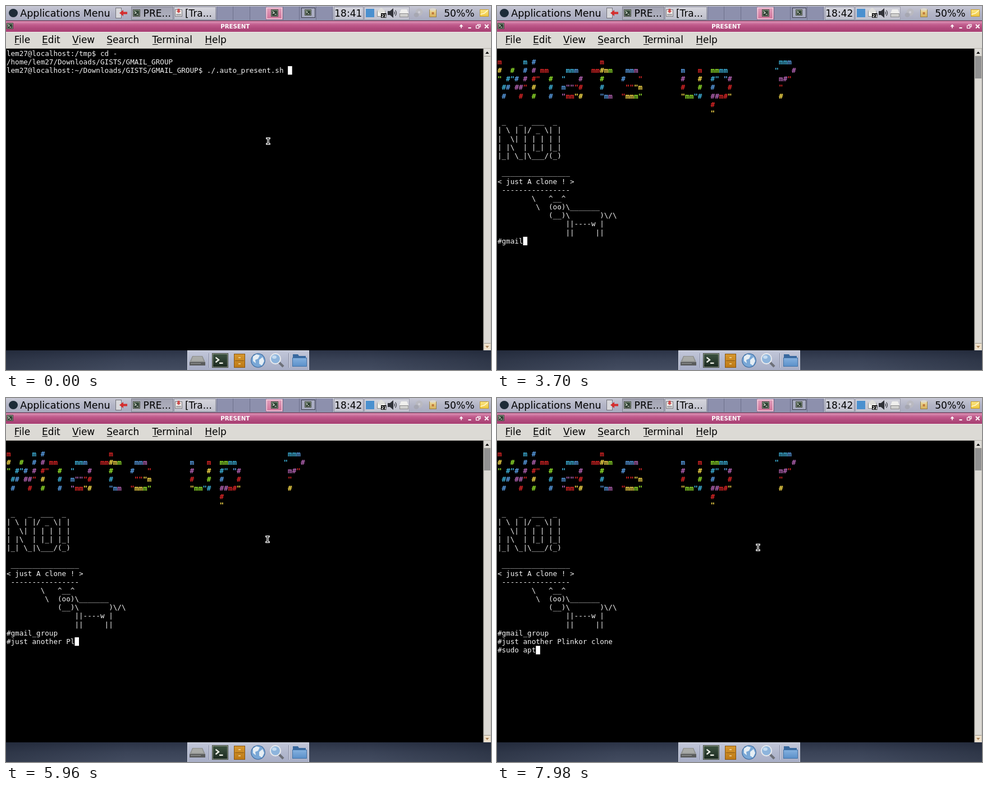
These frames come from a looping animation (864 by 648 pixels, 8 s). An HTML page with a canvas:

```html
<!DOCTYPE html>
<html lang="en">
<head>
<meta charset="utf-8">
<title>Terminal session</title>
<style>
html, body { margin: 0; width: 100%; height: 100%; overflow: hidden; background: #000; }
canvas { display: block; }
</style>
</head>
<body>
<canvas id="stage" width="864" height="648"></canvas>
<script>
const ctx = document.getElementById('stage').getContext('2d');
const SANS = '"DejaVu Sans", sans-serif';
const MONO = '"DejaVu Sans Mono", monospace';
const LOOP = 8000;
const CELL = { w: 7.594, h: 15.1875, x: 0.9, y: 76.7, base: 12 };
const RAINBOW = ['#b565b5', '#dc2626', '#fbdc4a', '#93e42c', '#3fb4dc', '#5a9fe6'];

// ---- terminal content ----
const PROMPT = [
  'lem27@localhost:/tmp$ cd -',
  '/home/lem27/Downloads/GISTS/GMAIL_GROUP',
  'lem27@localhost:~/Downloads/GISTS/GMAIL_GROUP$ ./.auto_present.sh '
];

const BANNER = [
  'm     m #               m                                         mmm',
  '#  #  # # mm    mmm   mm#mm   mmm          m   m  mmmm           "   #',
  '" #"# # #"  #  "   #    #    #   "         #   #  #" "#           m#"',
  ' ## ##" #   #  m"""#    #     """m         #   #  #   #           "',
  ' #   #  #   #  "mm"#    "mm  "mmm"         "mm"#  ##m#"           #',
  ' '.repeat(50) + '#',
  ' '.repeat(50) + '"'
];

const NO = [
  ' _   _  ___  _',
  '| \\ | |/ _ \\| |',
  '|  \\| | | | | |',
  '| |\\  | |_| |_|',
  '|_| \\_|\\___/(_)'
];

const COW = [
  ' ' + '_'.repeat(16),
  '< just A clone ! >',
  ' ' + '-'.repeat(16),
  '        \\   ^__^',
  '         \\  (oo)\\_______',
  '            (__)\\       )\\/\\',
  '                ||----w |',
  '                ||     ||'
];

// ---- timing ----
const keys = [];
const key = (t, s) => keys.push([t, s]);
const type = (t, s) => [...s].forEach((c, i) => key(t + i * 90, c));

key(3170, '#');
type(3340, 'gmail_gr');
key(4040, 'o');
key(4220, 'u');
key(4300, 'p');
key(4380, '\n');
key(4470, '#');
type(4560, 'just');
key(4910, ' ');
key(5080, 'a');
['no', 'th', 'er', ' P'].forEach((s, i) => key(5550 + i * 80, s));
type(5960, 'linkor cl');
key(6790, 'o');
key(6910, 'n');
key(7000, 'e');
key(7090, '\n');
type(7180, '#sudo');
key(7720, ' ');
key(7810, 'a');
key(7890, 'p');
key(7980, 't');

// pointer: time, x, y; null x hides it
const POINTER = [
  [0, 467, 240.5], [40, null], [3920, 467, 242.5], [4040, 466.5, 247.5],
  [4510, 466, 251.5], [6560, 466, 255], [6640, 465.5, 259],
  [6740, 465, 263.5], [6830, 465, 266]
];

// ---- drawing helpers ----
function rect(x, y, w, h, fill) {
  ctx.fillStyle = fill;
  ctx.fillRect(x, y, w, h);
}
function grad(x, y, w, h, ...stops) {
  const g = ctx.createLinearGradient(0, y, 0, y + h);
  stops.forEach((c, i) => g.addColorStop(i / (stops.length - 1), c));
  rect(x, y, w, h, g);
}
function frame(x, y, w, h, color, line = 1) {
  ctx.strokeStyle = color;
  ctx.lineWidth = line;
  ctx.strokeRect(x + 0.5, y + 0.5, w - 1, h - 1);
}
function poly(fill, ...p) {
  ctx.fillStyle = fill;
  ctx.beginPath();
  for (let i = 0; i < p.length; i += 2) ctx.lineTo(p[i], p[i + 1]);
  ctx.closePath();
  ctx.fill();
}
function path(color, line, ...p) {
  ctx.strokeStyle = color;
  ctx.lineWidth = line;
  ctx.beginPath();
  for (let i = 0; i < p.length; i += 2) ctx.lineTo(p[i], p[i + 1]);
  ctx.stroke();
}
function disc(x, y, rx, ry, fill) {
  ctx.fillStyle = fill;
  ctx.beginPath();
  ctx.ellipse(x, y, rx, ry, 0, 0, 7);
  ctx.fill();
}
function label(s, x, y, size, color = '#000', weight = '') {
  ctx.font = `${weight} ${size}px ${SANS}`;
  ctx.fillStyle = color;
  ctx.fillText(s, x, y);
}
function shellIcon(x, y, w, h) {
  rect(x, y, w, h, '#d8dcd0');
  frame(x, y, w, h, '#40483c');
  grad(x + 1.5, y + 1.5, w - 3, h - 3, '#3c5240', '#1c2a20');
  const u = h / 12;
  path('#f0f4ea', u * 1.1, x + u * 3, y + u * 3.5, x + u * 5.5, y + u * 5.5, x + u * 3, y + u * 7.5);
  path('#f0f4ea', u * 1.1, x + u * 6, y + u * 8.2, x + u * 9, y + u * 8.2);
}

// ---- desktop ----
function tray() {
  rect(641, 5, 15, 15, '#4a90cf');

  rect(661, 8, 15, 11, '#f2f2ee');
  frame(661, 8, 15, 11, '#8a8a88');
  poly('#dededa', 661, 9, 668.5, 3, 676, 9, 668.5, 14);
  rect(668, 13, 9.5, 8, '#000');
  label('21', 668.5, 19.6, 7, '#fff', 'bold');

  poly('#303238', 680, 9, 684, 9, 690, 4, 690, 21, 684, 16, 680, 16);
  ctx.strokeStyle = '#44464e';
  ctx.lineWidth = 1.3;
  [3, 6].forEach(r => {
    ctx.beginPath();
    ctx.arc(689.5, 12.5, r, -0.9, 0.9);
    ctx.stroke();
  });

  poly('#f0f0ee', 704, 6, 714, 6, 717, 13, 701, 13);
  rect(701, 13, 16, 7, '#d0d0ce');
  frame(701, 13, 16, 7, '#8c8c8e');

  disc(736, 11, 6.5, 6.5, '#b9b9c0');
  disc(736, 11, 2, 2, '#d0d0d8');
  disc(731, 16, 4.5, 4, '#a6a7b2');

  grad(754, 6, 13, 14, '#f0dfa4', '#d4ac52');
  frame(754, 6, 13, 14, '#94804e');
  disc(760.5, 6, 6, 2.2, '#dcd8cc');
  rect(758.5, 11, 4, 4, '#c07a3a');

  grad(844, 6, 16, 13, '#fce886', '#eec63c');
  frame(844, 6, 16, 13, '#c49a28');
  path('#fff8d0', 1.4, 845, 15, 852, 13, 859, 7);
}

function topPanel(clock) {
  grad(0, 0, 864, 26, '#c6c7d4', '#b3b5c6', '#a9abc0');
  rect(0, 25, 864, 1, '#85869a');
  disc(13, 12.5, 8, 7.5, '#1d2b38');
  label('Applications Menu', 25.2, 18.6, 17.5);

  rect(195, 3, 11, 19, '#d8d8dc');
  frame(195, 3, 11, 19, '#74747c');
  poly('#d42f2f', 202, 12.5, 209, 7, 209, 10.5, 216, 10.5, 216, 14.5, 209, 14.5, 209, 18);

  grad(223, 1, 75, 24, '#a2a3b2', '#b2b3c1');
  frame(223, 1, 75, 24, '#81828f');
  shellIcon(226, 6, 13, 13);
  label('PRE...', 244.6, 18.6, 17.1);
  grad(299, 1, 75, 24, '#d6d6dd', '#bebfcb');
  frame(299, 1, 75, 24, '#8c8d9c');
  rect(301, 6, 13, 13, '#ebe9e6');
  frame(301, 6, 13, 13, '#77777c');
  rect(303, 14, 9, 3, '#a9a9ae');
  poly('#cc4b4b', 305.5, 5, 309.5, 5, 309.5, 9, 311.5, 9, 307.5, 12.5, 303.5, 9, 305.5, 9);
  label('[Tra...', 319, 18.6, 16.9);

  rect(375, 1, 206, 24, '#8d90ad');
  for (let i = 0; i <= 7; i++) rect(Math.round(374.5 + i * 29.5), 1, 1, 24, '#6d708c');
  grad(463, 2, 30, 22, '#e2a0bd', '#cf7299');
  frame(464, 3, 28, 20, '#f6e4ec');
  shellIcon(472, 6, 13, 13);
  rect(526, 3, 25, 18, '#a9acc2');
  frame(526, 3, 25, 18, '#3d404e');
  shellIcon(532, 6, 12, 11);

  grad(584, 1, 53, 24, '#d3d4dd', '#c0c1ce');
  frame(584, 1, 53, 24, '#8e8fa0');
  label(clock, 585.3, 18.6, 17);
  grad(638, 1, 81, 24, '#d3d4dd', '#c0c1ce');
  frame(638, 1, 81, 24, '#9a9bab');
  tray();
  label('50%%', 780.2, 18.6, 17.1);
}

function windowBars() {
  rect(0, 26, 864, 1, '#7a2c52');
  grad(0, 27, 864, 19, '#dd94b6', '#c15c8d', '#b14a7c', '#a83f73');
  shellIcon(1, 30, 12, 11);
  label('PRESENT', 382.2, 40.4, 10.2, '#fff', 'bold');

  const w = '#fff';
  path(w, 1.6, 811, 39.5, 811, 34);
  poly(w, 807.5, 36.5, 811, 32.5, 814.5, 36.5);
  rect(823.5, 38, 5, 2, w);
  frame(839.5, 32.5, 6, 5, w, 1.2);
  rect(837, 34.5, 6, 5.5, '#b75082');
  frame(837, 34.5, 6, 5.5, w, 1.2);
  path(w, 1.8, 853, 33, 859.5, 39.5);
  path(w, 1.8, 859.5, 33, 853, 39.5);

  rect(0, 46, 864, 30, '#dcdad5');
  rect(0, 46, 864, 1, '#f0efec');
  rect(0, 75, 864, 1, '#b4b1aa');
  const menu = { File: 14.8, Edit: 64, View: 118, Search: 179.3, Terminal: 260.5, Help: 354.3 };
  for (const [name, x] of Object.entries(menu)) {
    label(name, x, 66.4, 16.9);
    rect(x + 0.5, 68, ctx.measureText(name[0]).width - 1, 1, '#000');
  }
}

function scrollbar(scrolled) {
  rect(850.5, 76, 13.5, 537, '#dcdad5');
  rect(850.5, 76, 1, 537, '#b2afa8');
  rect(863, 76, 1, 537, '#c0bdb6');
  if (scrolled) rect(851.5, 89, 11.5, 40, '#929292');
  rect(851.5, 89, 11.5, 1, '#9a978f');
  rect(851.5, 600, 11.5, 1, '#9a978f');
  rect(852, 601, 11, 11, '#eee0ca');
  poly('#000', 854, 85, 857.2, 81, 860.5, 85);
  poly('#a8835a', 854, 605, 857.2, 609, 860.5, 605);
}

function dock() {
  grad(0, 613, 864, 35, '#2b3346', '#3a4357', '#434c60');
  const shade = ctx.createLinearGradient(0, 0, 864, 0);
  [0.32, 0, 0, 0.32].forEach((a, i) => shade.addColorStop([0, 0.25, 0.75, 1][i], `rgba(20,26,38,${a})`));
  rect(0, 613, 864, 35, shade);
  grad(323, 613, 217, 35, '#c3c8da', '#b3b9ce', '#a8aec6');
  frame(323, 613, 217, 36, '#d6dae6');

  poly('#8f918f', 332, 623, 350, 623, 355, 634, 327, 634);
  poly('#a9aba8', 333, 624, 349, 624, 352, 632, 330, 632);
  rect(327, 634, 28, 6, '#5a5c5c');
  rect(329, 636, 18, 1, '#9c9e9c');

  shellIcon(367, 618, 29, 26);

  grad(406, 619, 20, 25, '#d6982f', '#bd7916');
  frame(406, 619, 20, 25, '#875512');
  rect(408, 631, 16, 1, '#8c5a14');
  rect(414, 625, 4, 2, '#e8c684');
  rect(414, 636, 4, 2, '#e8c684');

  disc(449, 631, 12.8, 12.8, '#34659c');
  disc(449, 631, 11.8, 11.8, '#79a7d6');
  poly('#e6eef4', 440, 624, 446, 620, 452, 622, 449, 628, 444, 630, 445, 636, 440, 632);
  poly('#e6eef4', 451, 630, 457, 625, 460, 632, 456, 640, 451, 637);

  path('#6d7078', 4.5, 486, 634, 494, 642);
  disc(480, 628, 10, 10, '#e9ebee');
  disc(480, 628, 8, 8, '#8db4dc');
  disc(478, 625, 4, 3, '#c6dcf0');

  poly('#39699f', 511, 620, 520, 620, 522, 623, 534, 623, 534, 641, 511, 641);
  grad(510, 626, 26, 16, '#86b2e0', '#5a8fc8');
  frame(510, 626, 26, 16, '#3f72a8');

  [361, 503].forEach(x => {
    rect(x, 618, 1, 26, '#8489a0');
    rect(x + 1, 618, 1, 26, '#d8dbe6');
  });
}

// ---- terminal ----
function put(line, row, rainbow = false) {
  ctx.font = `${rainbow ? 'bold ' : ''}12.6px ${MONO}`;
  for (let i = 0; i < line.length; i++) {
    if (line[i] === ' ') continue;
    ctx.fillStyle = rainbow ? RAINBOW[((i >> 1) + row) % 6] : '#f4f4f4';
    ctx.fillText(line[i], CELL.x + i * CELL.w, CELL.y + row * CELL.h + CELL.base);
  }
}
function caret(col, row) {
  rect(CELL.x + col * CELL.w, CELL.y + row * CELL.h, CELL.w, CELL.h, '#fff');
}
function terminal(t) {
  rect(0, 76, 851, 537, '#000');
  if (t < 190) {
    PROMPT.forEach((s, i) => put(s, i));
    caret(PROMPT[2].length, 2);
    return;
  }
  BANNER.forEach((s, i) => put(s, i + 1, true));
  if (t < 1120) return caret(0, 8);
  NO.forEach((s, i) => put(s, i + 8));
  if (t < 2170) return caret(0, 14);
  COW.forEach((s, i) => put(s, i + 14));
  const typed = keys.filter(k => k[0] <= t).map(k => k[1]).join('').split('\n');
  typed.forEach((s, i) => put(s, i + 22));
  caret(typed[typed.length - 1].length, typed.length + 21);
}
function beam(x, y, pad, fill) {
  rect(x - 0.6 - pad, y - 5, 1.2 + pad * 2, 10, fill);
  [-5, 5].forEach(dy => rect(x - 2.6 - pad, y + dy - 0.4 - pad, 5.2 + pad * 2, 0.8 + pad * 2, fill));
}
function pointer(t) {
  const [, x, y] = POINTER.filter(p => p[0] <= t).pop();
  if (x === null) return;
  beam(x, y, 1.2, '#fff');
  beam(x, y, 0, '#000');
}

function draw() {
  const t = performance.now() % LOOP;
  terminal(t);
  scrollbar(t >= 190);
  topPanel(t < 1040 ? '18:41' : '18:42');
  windowBars();
  dock();
  pointer(t);
  requestAnimationFrame(draw);
}
draw();
</script>
</body>
</html>
```
